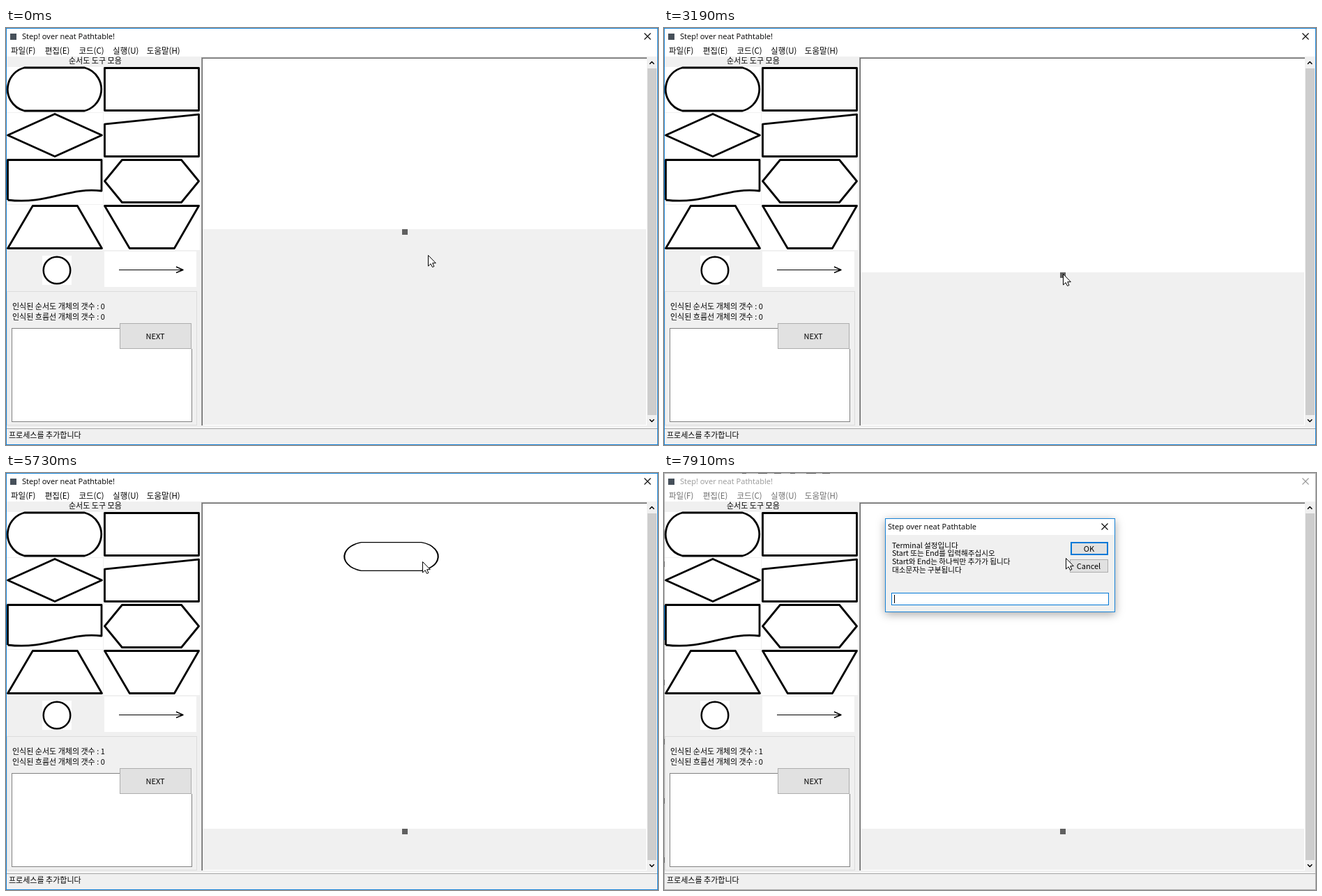
Recreate the animation shown at these times as an HTML page with a canvas. Size 935x599 px, loop 8 s.

```html
<!DOCTYPE html>
<html lang="ko">
<head>
<meta charset="utf-8">
<title>Flowchart editor</title>
<style>
  html, body { margin: 0; width: 100%; height: 100%; overflow: hidden; background: #f0f0f0; }
  canvas { display: block; }
</style>
</head>
<body>
<canvas id="stage" width="935" height="599"></canvas>
<script>
const ctx = document.getElementById('stage').getContext('2d');
const LOOP = 8000, STEP = 77.45;
const FACE = '#f0f0f0', BLUE = '#0078d7';
const HANGUL = '"Noto Sans CJK KR", "Noto Sans CJK", sans-serif';
const LATIN = '"Open Sans", "Noto Sans CJK KR", sans-serif';

const CELL = { x: 1, y: 56, w: 139, h: 66 };
const TOOLS = ['터미널을', '프로세스를', '판단을', '읽기를', '출력을', '준비를', '반복을', '연산을'];
const SHAPE_ADDED = 61, COUNTED = 63, DEACTIVATED = 88, OPENED = 92;

// Pointer moves, timed in steps; a drag carries its object along
const START = { x: 605, y: 326 };
const moves = [
  { from: 0, to: 10, x: 572, y: 294 },
  { from: 11, to: 22, x: 584, y: 513, drag: 'page' },
  { from: 26, to: 27, x: 584, y: 503 },
  { from: 29, to: 36, x: 574, y: 510 },
  { from: 38, to: 42, x: 572, y: 330, drag: 'page' },
  { from: 43, to: 49, x: 573, y: 513, drag: 'page' },
  { from: 49, to: 54, x: 266, y: 247 },
  { from: 54, to: 59, x: 100, y: 105 },
  { from: 62, to: 67, x: 395, y: 72 },
  { from: 67, to: 74, x: 597, y: 127, drag: 'shape' },
  { from: 79, to: 81, x: 615, y: 127, drag: 'shape' },
  { from: 82, to: 85, x: 576, y: 122 }
];
const easeOut = f => 1 - (1 - f) ** 1.5;

function poseAt(k) {
  const pose = { pointer: { ...START }, page: { x: 568, y: 289 }, shape: { x: 282, y: 44 } };
  for (const { from, to, x, y, drag } of moves) {
    if (k <= from) break;
    const f = easeOut(Math.min(1, (k - from) / (to - from)));
    const dx = (x - pose.pointer.x) * f, dy = (y - pose.pointer.y) * f;
    for (const part of ['pointer', drag]) {
      if (!part) continue;
      pose[part].x += dx;
      pose[part].y += dy;
    }
  }
  return pose;
}

// The status bar keeps the tool that was hovered last
function hintAt(k) {
  for (; k > 0; k--) {
    const { x, y } = poseAt(k).pointer;
    const col = Math.floor((x - CELL.x) / CELL.w), row = Math.floor((y - CELL.y) / CELL.h);
    if (col < 2 && row >= 0 && row < 4) return TOOLS[row * 2 + col];
  }
  return TOOLS[1];
}

function rect(x, y, w, h, fill, line, width = 1) {
  ctx.fillStyle = line || fill;
  ctx.fillRect(x, y, w, h);
  if (!line) return;
  ctx.fillStyle = fill;
  ctx.fillRect(x + width, y + width, w - 2 * width, h - 2 * width);
}

function text(s, x, y, size = 11, color = '#000', family = HANGUL, align = 'left') {
  ctx.font = `${size}px ${family}`;
  ctx.textAlign = align;
  ctx.fillStyle = color;
  ctx.fillText(s, x, y);
}

function stroke(width, color = '#000') {
  ctx.strokeStyle = color;
  ctx.lineWidth = width;
  ctx.stroke();
}

function path(points, closed) {
  ctx.beginPath();
  points.forEach(([x, y]) => ctx.lineTo(x, y));
  if (closed) ctx.closePath();
}

function cross(x, y, color) {
  ctx.beginPath();
  for (const d of [-4.5, 4.5]) {
    ctx.moveTo(x - d, y - 4.5);
    ctx.lineTo(x + d, y + 4.5);
  }
  stroke(1.1, color);
}

function terminal(x, y, scaleY, width) {
  ctx.save();
  ctx.translate(x, y);
  ctx.scale(1, scaleY);
  ctx.beginPath();
  ctx.arc(33.3, 32, 32, Math.PI - 1.32, Math.PI + 1.32);
  ctx.arc(103.7, 32, 32, -1.32, 1.32);
  ctx.closePath();
  ctx.fillStyle = '#fff';
  ctx.fill();
  stroke(width);
  ctx.restore();
}

function chrome(active) {
  rect(0, 0, 935, 599, FACE, active ? '#1883d7' : '#aaa');
  rect(1, 1, 933, 40, '#fff');
  rect(6, 8, 9, 9, '#46505a');
  const title = active ? '#000' : '#999';
  text('Step! over neat Pathtable!', 23, 16, 11.1, title, LATIN);
  cross(920, 12, title);
  ['파일(F)', '편집(E)', '코드(C)', '실행(U)', '도움말(H)'].forEach((label, i) =>
    text(label, 7 + i * 48.7, 37, 11.5, active ? '#000' : '#6d6d6d'));
  if (active) return;
  // Dark content shows through the translucent edge
  for (let i = 0; i < 6; i++) {
    rect(112 + i * 23, 0, 6 + i * 7 % 10, 1, '#555');
    rect(0, 127 + i * 85, 1, 8, '#666');
  }
}

function palette() {
  text('순서도 도구 모음', 90, 51);
  TOOLS.forEach((_, i) =>
    rect(CELL.x + i % 2 * CELL.w, CELL.y + (i >> 1) * CELL.h, 138, 65, '#fff'));

  // Corners are fractions of the outline's box
  const outline = (col, row, corners) => {
    const x = 2.5 + col * CELL.w, y = 57.5 + row * CELL.h;
    path(corners.map(([u, v]) => [x + u * 135, y + v * 61]), true);
    stroke(2.8);
  };
  terminal(CELL.x, CELL.y, 1, 2.8);
  outline(1, 0, [[0, 0], [1, 0], [1, 1], [0, 1]]);
  outline(0, 1, [[0, .5], [.5, 0], [1, .5], [.5, 1]]);
  outline(1, 1, [[0, .24], [1, .01], [1, 1], [0, 1]]);
  outline(1, 2, [[0, .5], [.185, 0], [.815, 0], [1, .5], [.815, 1], [.185, 1]]);
  outline(0, 3, [[.265, 0], [.74, 0], [1, 1], [0, 1]]);
  outline(1, 3, [[0, 0], [1, 0], [.74, 1], [.265, 1]]);

  path([[2.5, 247], [2.5, 189.5], [137, 189.5], [137, 234]]);
  ctx.bezierCurveTo(90, 228, 60, 254, 2.5, 247);
  stroke(2.8);
  rect(0, 190, 1, 50, BLUE);

  rect(52, 327, 42, 42, '#fff');
  ctx.beginPath();
  ctx.arc(73, 348, 19.3, 0, 7);
  stroke(2.5);

  rect(141, 321, 132, 51, '#fff');
  rect(162, 347, 92, 1, '#000');
  path([[244, 343], [254, 347.5], [244, 351.5]]);
  stroke(1.4);
}

function counters(count) {
  rect(1, 378, 273, 193, FACE, '#dcdcdc');
  text('인식된 순서도 개체의 갯수 : ' + count, 9, 404);
  text('인식된 흐름선 개체의 갯수 : 0', 9, 419);
  rect(8, 431, 259, 135, '#fff', '#828282');
  rect(163, 424, 104, 37, FACE);
  rect(163, 424, 103, 37, '#e1e1e1', '#adadad');
  text('NEXT', 214, 447, 11, '#000', HANGUL, 'center');
}

function workspace({ x, y }) {
  const bottom = Math.round(y);
  rect(280, 42, 639, 529, '#a0a0a0');
  rect(281, 43, 638, 528, '#696969');
  rect(282, 44, 637, 527, '#fff');
  rect(282, 44, 636, 526, FACE);
  rect(282, 44, 636, bottom - 44, '#fff');
  rect(568, bottom, 8, 8, '#606060');
  rect(919, 43, 15, 528, FACE);
  rect(920, 58, 13, 498, '#cdcdcd');
  for (const [tip, d] of [[48.5, 3.2], [565.5, -3.2]]) {
    path([[923, tip + d], [926.2, tip], [929.4, tip + d]]);
    stroke(1.5);
  }
}

function statusBar(hint) {
  rect(1, 574, 933, 1, '#fff');
  rect(1, 575, 933, 1, '#a0a0a0');
  text(hint + ' 추가합니다', 4, 589);
}

function dialog(progress, caret) {
  const alpha = easeOut(progress), scale = .92 + .08 * alpha;
  ctx.save();
  ctx.globalAlpha = alpha;
  ctx.translate(482, 132.5);
  ctx.scale(scale, scale);
  ctx.translate(-482, -132.5);
  ctx.save();
  ctx.shadowColor = 'rgba(0,0,0,.35)';
  ctx.shadowBlur = 12;
  ctx.shadowOffsetY = 3;
  rect(317, 65, 330, 135, '#1883d7');
  ctx.restore();
  rect(318, 66, 328, 133, FACE);
  rect(318, 66, 328, 23, '#fff');
  text('Step over neat Pathtable', 321, 81, 11.1, '#000', LATIN);
  cross(632, 77, '#000');
  ['Terminal 설정입니다', 'Start 또는 End를 입력해주십시오',
   'Start와 End는 하나씩만 추가가 됩니다', '대소문자는 구분됩니다']
    .forEach((line, i) => text(line, 327, 107.5 + i * 11.8, 10.6));
  rect(583, 99, 54, 19, '#e1e1e1', BLUE, 2);
  text('OK', 609.5, 113, 11, '#000', HANGUL, 'center');
  rect(582, 124, 55, 19, '#e1e1e1', '#adadad');
  text('Cancel', 609, 137.5, 11, '#000', HANGUL, 'center');
  rect(326, 172, 312, 18, '#fff', BLUE);
  if (caret) rect(330, 175, 1, 12, '#000');
  ctx.restore();
}

function arrow({ x, y }) {
  ctx.save();
  ctx.translate(Math.round(x) + .5, Math.round(y) + .5);
  path([[0, 0], [0, 15.5], [3.6, 12.2], [6, 17], [8.4, 16], [6.2, 11.2], [10.8, 11.2]], true);
  ctx.fillStyle = '#fff';
  ctx.fill();
  stroke(1);
  ctx.restore();
}

function draw() {
  const t = performance.now() % LOOP;
  const k = Math.floor((t + 8) / STEP);
  const { pointer, page, shape } = poseAt(k);
  ctx.lineJoin = 'round';
  chrome(k < DEACTIVATED);
  palette();
  counters(k < COUNTED ? 0 : 1);
  workspace(page);
  statusBar(hintAt(k));
  if (k >= SHAPE_ADDED) terminal(Math.round(shape.x), Math.round(shape.y), 42 / 64, 2.1);
  if (k > DEACTIVATED) {
    const progress = Math.min(1, (k - DEACTIVATED) / (OPENED - DEACTIVATED));
    dialog(progress, t < 7360 || t >= 7910);
  }
  arrow(pointer);
  requestAnimationFrame(draw);
}
draw();
</script>
</body>
</html>
```
